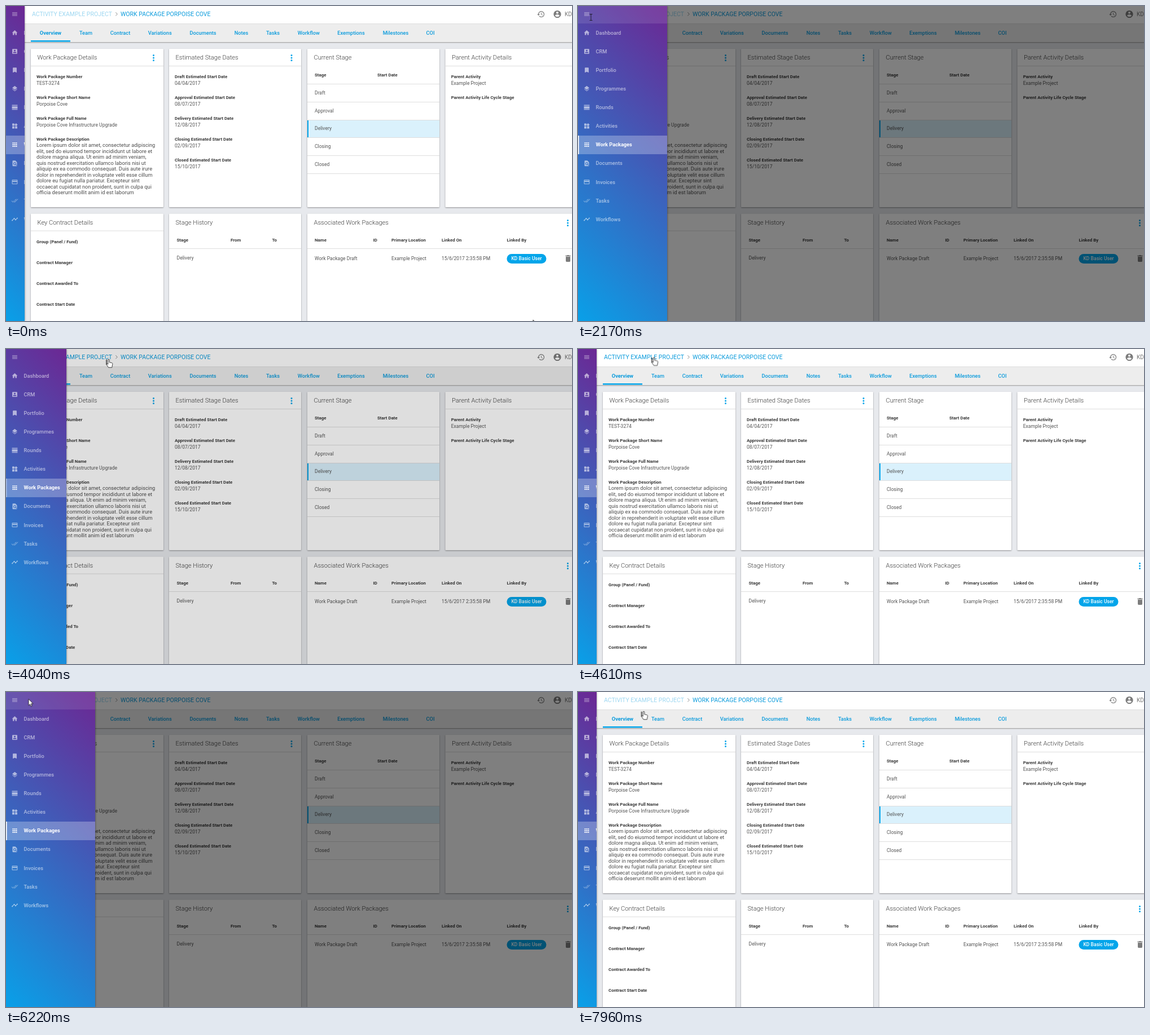
An HTML page for the animation above (8000 ms loop, 1003 px wide and 559 px high).

```html
<!DOCTYPE html>
<html lang="en">
<head>
<meta charset="utf-8">
<title>Work package overview</title>
<style>
html, body { margin: 0; width: 100%; height: 100%; overflow: hidden; }
#stage { position: relative; width: 1003px; height: 559px; overflow: hidden; background: #e7e9ed; }
#stage > *, nav svg { position: absolute; left: 0; top: 0; display: block; }
svg { font-family: Roboto, "Open Sans", sans-serif; }

.head { font-size: 11.15px; font-weight: 300; fill: #3c3c3c; }
.label { font-size: 7.92px; font-weight: 700; fill: #3a3a3a; }
.body { font-size: 8.58px; fill: #555; }
.para { font-size: 9.24px; fill: #4c4c4c; }
.crumb { font-size: 10.52px; fill: #0a9bdc; }
.tab { font-size: 9.24px; font-weight: 500; fill: #0a9bdc; text-anchor: middle; }
.tab.on { font-weight: 700; }
.pill { font-size: 8.58px; font-weight: 500; fill: #fff; text-anchor: middle; }
.user { font-size: 10px; fill: #777; }
.menu { font-size: 9.24px; font-weight: 500; fill: #fff; }
.card { fill: #fff; filter: drop-shadow(0 1px 1px rgba(0, 0, 0, .38)); }
.rule { fill: #dedede; }
.blue { fill: #03a5ea; }
.gray { fill: #7c7c7c; }
.item { opacity: .58; color: #fff; }
.item.on { opacity: 1; }
.item.on text { font-weight: 700; }

.shade, nav, .crumb.link, .hover, .mark, #cursor, #cursor path { animation: 8s linear infinite; }
.shade { width: 100%; height: 100%; background: rgba(0, 0, 0, .5); animation-name: dim; animation-timing-function: ease-in-out; }
nav {
  height: 559px; overflow: hidden;
  background: linear-gradient(45deg, #09a0e8, #6c2793);
  box-shadow: 0 0 3px rgba(0, 0, 0, .5);
  animation-name: slide; animation-timing-function: ease-in-out;
}
.mark { animation-name: dim; }
.hover { animation-name: hover; animation-timing-function: step-end; }
.crumb.link { animation-name: link; }
#cursor { overflow: visible; animation-name: move; animation-timing-function: ease-in-out; }
#cursor path { fill: #fff; stroke: #111; stroke-width: .8; stroke-linejoin: round; animation-timing-function: step-end; }
#cursor .arrow { animation-name: arrow; }
#cursor .beam { fill: none; animation-name: beam; }
#cursor .hand { animation-name: hand; }

@keyframes slide {
  0%, 21.75%, 53%, 66.25%, 93.1%, 100% { width: 33px; }
  26.4%, 48.5%, 70.75%, 88.6% { width: 158px; }
}
@keyframes dim {
  0%, 21.75%, 51.6%, 66.25%, 91.7%, 100% { opacity: 0; }
  25%, 48.5%, 69.4%, 88.6% { opacity: 1; }
}
@keyframes hover {
  0%, 48.2%, 88.4%, 100% { opacity: 0; }
  21.8%, 66.3% { opacity: .1; }
}
@keyframes link {
  0%, 49.3%, 65.2%, 88.8%, 98.2%, 100% { opacity: .4; }
  50%, 64.6%, 89.6%, 97.4% { opacity: 1; }
}
@keyframes arrow { 0%, 40.4%, 64.8% { opacity: 1; } 9.9%, 48.4%, 88.6%, 100% { opacity: 0; } }
@keyframes beam { 0%, 40.4%, 100% { opacity: 0; } 9.9% { opacity: 1; } }
@keyframes hand { 0%, 64.8% { opacity: 0; } 48.4%, 88.6%, 100% { opacity: 1; } }
@keyframes move {
  0%, .8% { transform: translate(934px, 557px); }
  10.4%, 11.3% { transform: translate(343.5px, 168.5px); }
  20.75%, 21.4% { transform: translate(46.5px, 33.5px); }
  22.8%, 40% { transform: translate(23px, 20px); }
  49% { transform: translate(167px, 17px); }
  50.6% { transform: translate(182px, 18px); }
  56% { transform: translate(182px, 18px); animation-timing-function: linear; }
  57.6% { transform: translate(135.5px, 14.5px); animation-timing-function: ease-out; }
  65.5% { transform: translate(37px, 12px); }
  66.8%, 77.8% { transform: translate(40px, 12.5px); }
  81% { transform: translate(28px, 14px); }
  87.6% { transform: translate(156px, 15px); }
  90% { transform: translate(179.5px, 17px); }
  91.2%, 96% { transform: translate(184px, 19px); animation-timing-function: ease-out; }
  99.5%, 100% { transform: translate(116.5px, 34px); }
}
</style>
</head>
<body>
<div id="stage">
  <svg id="page" width="1003" height="559"></svg>
  <div class="shade"></div>
  <nav><svg id="side" width="158" height="559"></svg></nav>
  <svg id="cursor" width="1" height="1">
    <path class="arrow" d="M0 0V11.4L2.6 9 4.3 13 6.1 12.2 4.5 8.2H8Z"/>
    <path class="beam" d="M-2.5-5.5h5M0-5.5v11M-2.5 5.5h5"/>
    <path class="hand" d="M-1.2 1Q0-.8 1.2 1V5.6L5.6 6.6Q7 7 6.9 8.6L5.8 14.8H-.4L-3.8 9.6Q-4-8 -3.8 9.6-4 7.8-2.4 8.2L-1.2 9.2Z"/>
  </svg>
</div>
<script>
const page = document.getElementById("page");
const side = document.getElementById("side");

function add(parent, tag, attrs, text) {
  const el = document.createElementNS("http://www.w3.org/2000/svg", tag);
  for (const key in attrs) el.setAttribute(key, attrs[key]);
  if (text) el.textContent = text;
  parent.appendChild(el);
  return el;
}
const box = (cls, x, y, width, height, rx = 0) =>
  add(page, "rect", { class: cls, x, y, width, height, rx });
const write = (cls, x, y, text) => add(page, "text", { class: cls, x, y }, text);
const row = (cls, y, cells) => cells.forEach(([x, text]) => write(cls, x, y, text));
const icon = (parent, cx, cy, scale, d, attrs) =>
  add(parent, "path", { d, transform: `translate(${cx - 12 * scale} ${cy - 12 * scale}) scale(${scale})`, "fill-rule": "evenodd", ...attrs });

function dots(x, y) {
  for (const dy of [-4.6, 0, 4.6]) add(page, "circle", { class: "blue", cx: x, cy: y + dy, r: 1.5 });
}
function card(x, y, w, h, title, ruled) {
  box("card", x, y, w, h, 1);
  write("head", x + 11.5, y + 19, title);
  if (ruled) box("rule", x, y + 30, w, 1);
}
function fields(x, y, list) {
  list.forEach(([label, value], i) => {
    write("label", x, y + i * 37.1, label);
    if (value) write("body", x, y + 12 + i * 37.1, value);
  });
}

// Top bar
box("card", 33, 0, 970, 31);
box("rule", 33, 31, 970, 1);
write("crumb link", 46, 18, "ACTIVITY EXAMPLE PROJECT");
add(page, "path", { d: "M194.3 11.3l3 3-3 3", fill: "none", stroke: "#888" });
write("crumb", 203, 18, "WORK PACKAGE PORPOISE COVE");
icon(page, 948, 14.5, .62, "M13 3c-5 0-9 4-9 9H1l4 4 4-4H6a7 7 0 1 1 2 5l-1.4 1.4A9 9 0 1 0 13 3zM12 8v5l4.3 2.5.7-1.2-3.5-2V8z", { class: "gray" });
icon(page, 977, 14.5, .66, "M12 2a10 10 0 1 0 .01 0zM12 5a3 3 0 1 1-.01 0zM6 16c0-2 4-3.1 6-3.1s6 1.1 6 3.1a7.2 7.2 0 0 1-12 0z", { class: "gray" });
write("user", 990, 18, "KD");

// Tabs
add(page, "rect", { x: 33, y: 32, width: 970, height: 32, fill: "#ededed" });
add(page, "rect", { x: 33, y: 64, width: 970, height: 1.6, fill: "#b4b4b4" });
box("blue", 44, 61, 70, 2.5);
[["Overview", 79], ["Team", 141.5], ["Contract", 202.5], ["Variations", 272.8], ["Documents", 349],
 ["Notes", 417], ["Tasks", 473], ["Workflow", 536.3], ["Exemptions", 611.5], ["Milestones", 690.5], ["COI", 752]]
  .forEach(([name, x], i) => write(i ? "tab" : "tab on", x, 50.5, name));

// Upper cards
card(44, 76, 235, 281, "Work Package Details", true);
dots(261.5, 92);
fields(54, 128, [
  ["Work Package Number", "TEST-3274"],
  ["Work Package Short Name", "Porpoise Cove"],
  ["Work Package Full Name", "Porpoise Cove Infrastructure Upgrade"],
  ["Work Package Description"]
]);
["Lorem ipsum dolor sit amet, consectetur adipiscing",
 "elit, sed do eiusmod tempor incididunt ut labore et",
 "dolore magna aliqua. Ut enim ad minim veniam,",
 "quis nostrud exercitation ullamco laboris nisi ut",
 "aliquip ex ea commodo consequat. Duis aute irure",
 "dolor in reprehenderit in voluptate velit esse cillum",
 "dolore eu fugiat nulla pariatur. Excepteur sint",
 "occaecat cupidatat non proident, sunt in culpa qui",
 "officia deserunt mollit anim id est laborum"]
  .forEach((line, i) => write("para", 54, 250 + i * 10.56, line));

card(289, 76, 234, 281, "Estimated Stage Dates", true);
dots(506, 92);
fields(299, 128, [
  ["Draft Estimated Start Date", "04/04/2017"],
  ["Approval Estimated Start Date", "08/07/2017"],
  ["Delivery Estimated Start Date", "12/08/2017"],
  ["Closing Estimated Start Date", "02/09/2017"],
  ["Closed Estimated Start Date", "15/10/2017"]
]);

card(534, 76, 234, 281, "Current Stage");
row("label", 125, [[547, "Stage"], [658, "Start Date"]]);
add(page, "rect", { x: 534, y: 202, width: 234, height: 31.5, fill: "#daf1fc" });
box("blue", 534, 202, 2, 31.5);
["Draft", "Approval", "Delivery", "Closing", "Closed"]
  .forEach((stage, i) => write("body", 547, 156.7 + i * 31.8, stage));
for (let i = 0; i < 6; i++) box("rule", 534, Math.round(138 + i * 31.75), 234, 1);

card(778.5, 76, 240, 281, "Parent Activity Details", true);
fields(788.7, 128, [["Parent Activity", "Example Project"], ["Parent Activity Life Cycle Stage"]]);

// Lower cards
card(44, 368.5, 235, 220, "Key Contract Details", true);
fields(54, 421, [["Group (Panel / Fund)"], ["Contract Manager"], ["Contract Awarded To"], ["Contract Start Date"]]);

card(289, 368.5, 234, 220, "Stage History");
row("label", 417.5, [[302.5, "Stage"], [398, "From"], [471.5, "To"]]);
box("rule", 289, 430, 234, 1);
write("body", 302.5, 449.5, "Delivery");

card(534, 368.5, 480, 220, "Associated Work Packages");
dots(995.5, 385);
row("label", 417.5, [[547, "Name"], [650.5, "ID"], [683, "Primary Location"], [772, "Linked On"], [887.5, "Linked By"]]);
box("rule", 534, 430, 469, 1);
row("body", 451.3, [[547, "Work Package Draft"], [683, "Example Project"], [772, "15/6/2017 2:35:58 PM"]]);
box("blue", 887.5, 440, 70, 17, 8.5);
write("pill", 922.5, 451.4, "KD Basic User");
icon(page, 996, 448, .66, "M6 19q0 2 2 2h8q2 0 2-2V7H6zM19 4h-3.5l-1-1h-5l-1 1H5v2h14z", { class: "gray" });

// Side menu
const line = { fill: "none", stroke: "currentColor", "stroke-width": 2 };
const menu = [
  ["", "M3 7h18M3 12h18M3 17h18", line],
  ["Dashboard", "M10 20v-6h4v6h5v-8h3L12 3 2 12h3v8z"],
  ["CRM", "M5 3h14q2 0 2 2v14q0 2-2 2H5q-2 0-2-2V5q0-2 2-2zM12 6a3 3 0 1 0 .01 0zM6 18v-1c0-2 4-3 6-3s6 1 6 3v1z"],
  ["Portfolio", "M7 3h10q2 0 2 2v16l-7-3-7 3V5q0-2 2-2z"],
  ["Programmes", "M12 2l9 7-9 7-9-7zM12 18.5l7.4-5.7L21 14l-9 7-9-7 1.6-1.2z"],
  ["Rounds", "M2 3h20v3H2zM2 8h20v8H2zM2 18h20v3H2z"],
  ["Activities", "M3 3h8v8H3zM3 13h8v8H3zM13 13h8v8h-8zM16.7 1.7l5.6 5.6-5.6 5.7L11 7.3z"],
  ["Work Packages", "M4 6h16M4 12h16M4 18h16", { ...line, "stroke-width": 4, "stroke-dasharray": "4 2" }],
  ["Documents", "M6 2h8l6 6v12q0 2-2 2H6q-2 0-2-2V4q0-2 2-2zM12 8a5 5 0 1 0 2.8 9.2l3.6 3.6 1.4-1.4-3.6-3.6A5 5 0 0 0 12 8zM12 10a3 3 0 1 1-.01 0z"],
  ["Invoices", "M4 4h16q2 0 2 2v12q0 2-2 2H4q-2 0-2-2V6q0-2 2-2zM4 12v6h16v-6zM4 6v2h16V6z"],
  ["Tasks", "M1 12.7l5.6 5.6M6.8 12.7l4.9 4.9L23 6.3M17.3 6.3l-6.4 6.4", line],
  ["Workflows", "M3 16l7-7 5 5 6-6", { ...line, "stroke-width": 2.2 }]
];
const ghost = (cls, y, width, height, opacity) =>
  add(side, "rect", { class: cls, y, width, height, fill: "#fff", "fill-opacity": opacity });
ghost("hover", 0, 158, 31, 1);
ghost("", 230, 158, 33, .27);
ghost("mark", 230, 1.6, 33, 1);
menu.forEach(([name, d, attrs], i) => {
  const y = 14.4 + i * 33.1;
  const item = add(side, "g", { class: name === "Work Packages" ? "item on" : "item" });
  icon(item, 15.5, y, .495, d, attrs || { fill: "currentColor" });
  if (name === "Workflows")
    for (const [dx, dy] of [[-4.4, 2], [-1, -1.5], [1.5, 1], [4.4, -2]])
      add(item, "circle", { cx: 15.5 + dx, cy: y + dy, r: 1, fill: "currentColor" });
  add(item, "text", { class: "menu", x: 31.5, y: y + 3.2 }, name);
});
</script>
</body>
</html>
```
